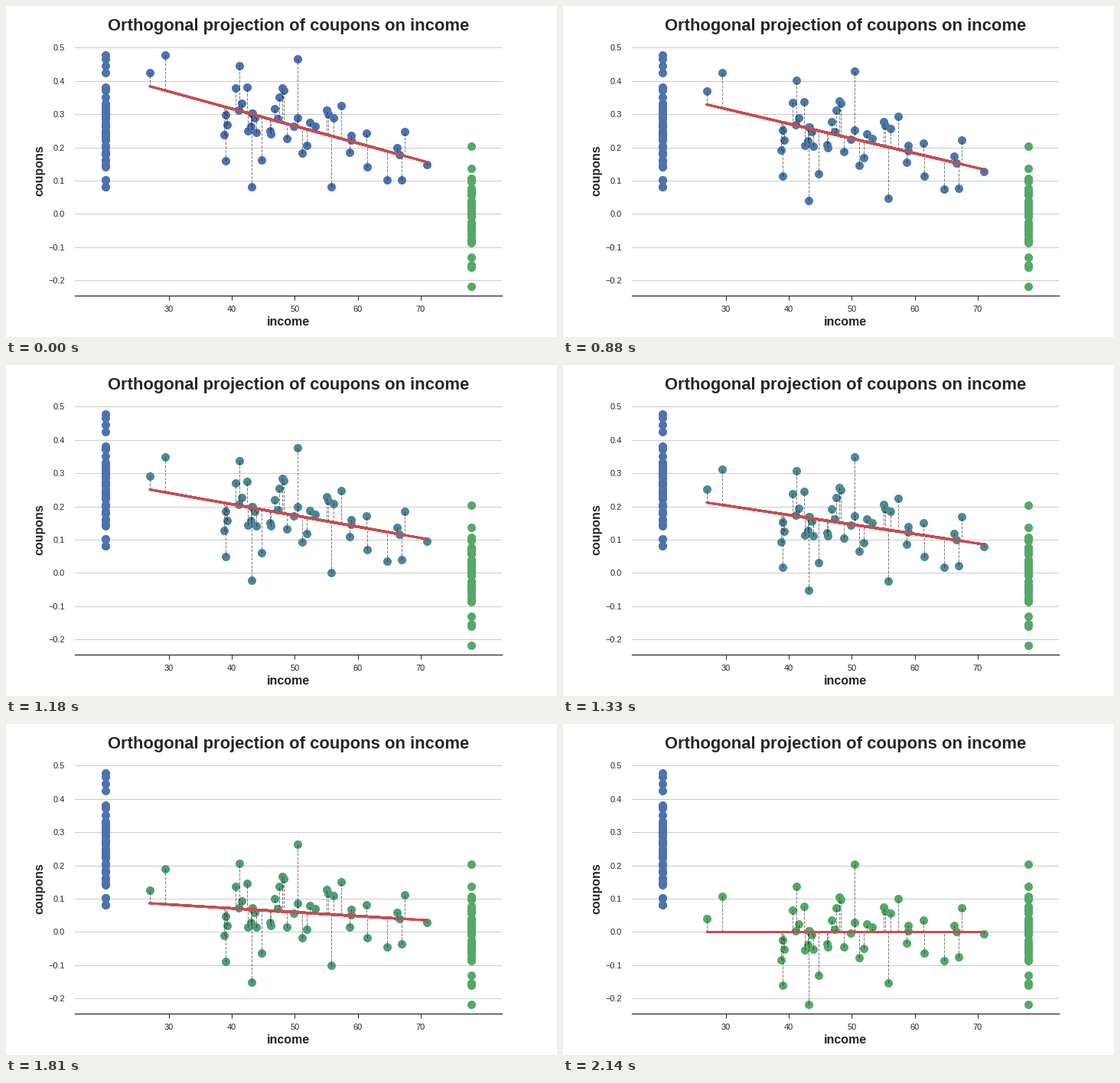
Write a matplotlib script that moves like this. It is 720 by 432 pixels and loops after 2840 ms.

```python
import numpy as np
import matplotlib.pyplot as plt
from matplotlib.animation import FuncAnimation
from matplotlib.collections import LineCollection

plt.rcParams["font.family"] = "Liberation Sans"
plt.rcParams["text.kerning_factor"] = 6

INK, GRID = "0.15", "0.8"
BLUE = np.array([0x4C, 0x72, 0xB0]) / 255
GREEN = np.array([0x55, 0xA8, 0x68]) / 255
RED = "#c44e52"

# timing in ticks of 10 ms: hold, 49 steps of 30 ms, hold
TICK, HOLD, STEP, STEPS = 10, 70, 3, 49
FRAMES = 2 * HOLD + (STEPS - 1) * STEP

# noisy linear sample and its least-squares fit
rng = np.random.RandomState(1)
income = rng.normal(50, 10, 50)
coupons = 0.5 - 0.005 * income + rng.normal(0, 0.1, 50)
trend = np.polyval(np.polyfit(income, coupons, 1), income)
residual = coupons - trend

fig = plt.figure(figsize=(10, 6), dpi=72, facecolor="white")
ax = fig.add_axes([0.125, 0.125, 0.775, 0.755])
ax.set(xlim=(15.12, 82.88), ylim=(-0.2455, 0.5057),
       xticks=range(30, 71, 10), yticks=np.arange(-2, 6) / 10)
ax.set_axisbelow(True)
ax.grid(axis="y", color=GRID, lw=1)
ax.spines[["left", "top", "right"]].set_visible(False)
ax.spines["bottom"].set(color=INK, linewidth=1.25)
ax.tick_params(length=6, pad=7, width=1, color=INK, labelcolor=INK, labelsize=11)
ax.tick_params(axis="y", width=0)


def label(x, y, text, size, **kw):
    """Bold text, placed in pixels from the top left."""
    fig.text(x / 720, 1 - y / 432, text, size=size, color=INK,
             weight="bold", ha="center", va="baseline", **kw)


label(369, 32, "Orthogonal projection of coupons on income", 22)
label(369, 417, "income", 16)
label(48, 215, "coupons", 16, rotation=90, rotation_mode="anchor")


def dots(x, y, color):
    return ax.scatter(x, y, s=100, lw=1, color=[color], zorder=1)


dots(np.full_like(coupons, 20), coupons, BLUE)
dots(np.full_like(residual, 78), residual, GREEN)
cloud = dots(income, coupons, BLUE)
drops = LineCollection([], colors="black", alpha=0.5, linewidths=1,
                       linestyles="--", zorder=2)
ax.add_collection(drops, autolim=False)
fit, = ax.plot([], [], color=RED, lw=3, solid_capstyle="round",
               solid_joinstyle="round", zorder=3)


def update(i):
    p = np.clip((i - HOLD) // STEP + 1, 0, STEPS) / STEPS
    base = trend * (1 - p)
    y = base + residual
    cloud.set_offsets(np.column_stack([income, y]))
    cloud.set_color([BLUE + (GREEN - BLUE) * p])
    drops.set_segments([[(x, min(a, b)), (x, max(a, b))]
                        for x, a, b in zip(income, y, base)])
    fit.set_data(income, base)
    return cloud, drops, fit


anim = FuncAnimation(fig, update, frames=FRAMES, interval=TICK,
                     repeat=True, repeat_delay=0)
plt.show()
```
